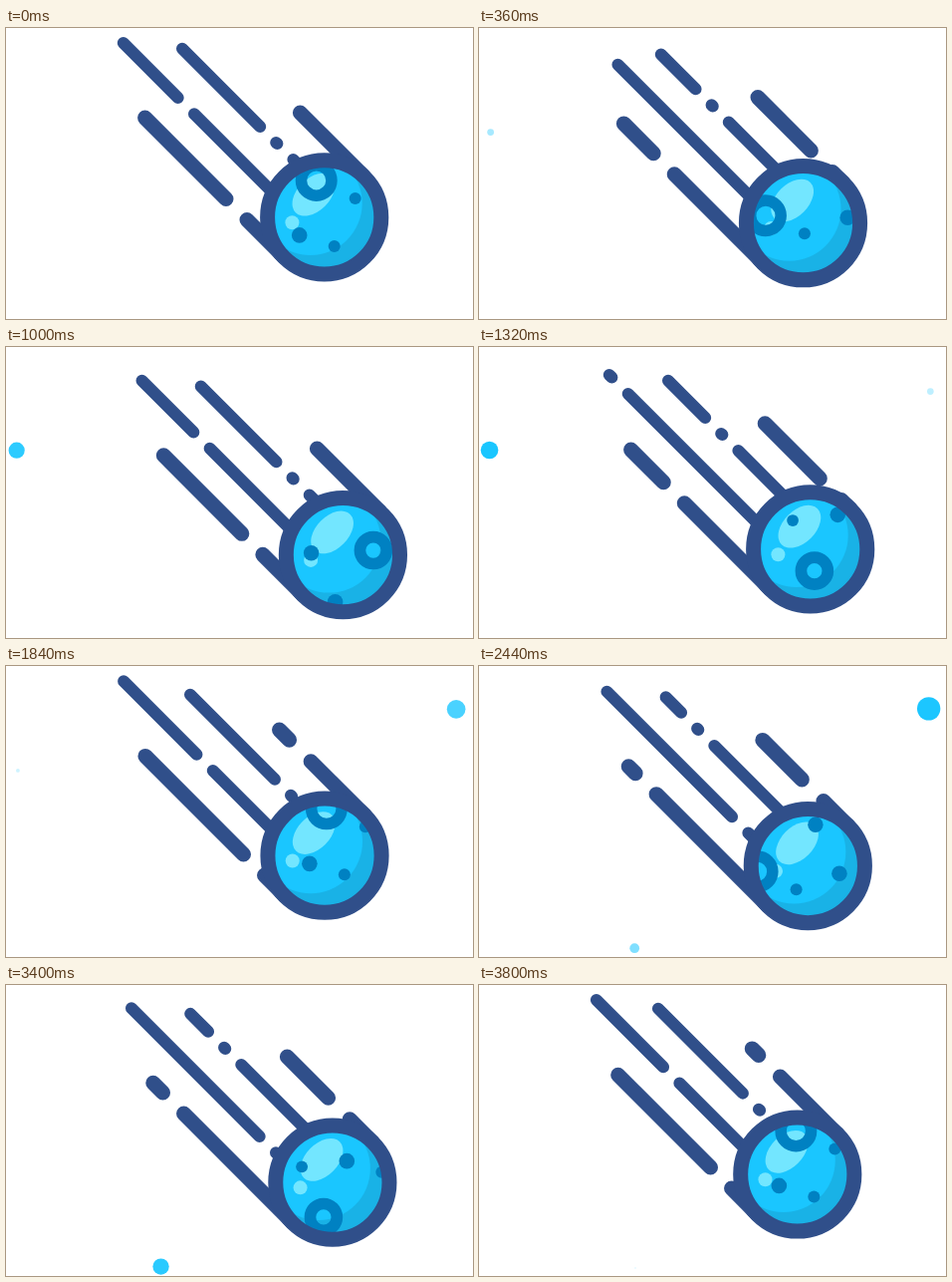
Animation, 469 px wide and 292 px high, one loop 3840 ms. Source, as an HTML page with a canvas:

```html
<!DOCTYPE html>
<html lang="en">
<head>
<meta charset="utf-8">
<title>Comet</title>
<style>
  html, body { margin: 0; width: 100%; height: 100%; overflow: hidden; background: #fff; }
  canvas { display: block; }
</style>
</head>
<body>
<canvas id="stage" width="469" height="292"></canvas>
<script>
const ctx = document.getElementById('stage').getContext('2d');

const LOOP = 3840, FLIGHT = 1920, STEP = 40;
const CYCLE = FLIGHT + STEP; // the moving patterns skip one step whenever a flight restarts
const NAVY = '#304f8a', CYAN = '#1ac6ff', SHADE = '#19b2e6', GLOW = '#73e6ff', CRATER = '#0081c2';
const INNER = 49.6, RIM = 15, CRATER_TRAVEL = 161;

// Diagonal streaks: x range, x - y, width, dash start at phase 0, dash pattern (measured along x)
const streaks = [
  { from: 117.8, to: 300, diff: 102.8, width: 12, start: 189, dash: [134.4, 16.3] },
  { from: 177, to: 320, diff: 156.3, width: 12, start: 288.4, dash: [85, 16, 1.2, 16] },
  { from: 139.6, to: 279.5, diff: 49.5, width: 15, start: 242, dash: [119.4, 21] },
  { from: 274.2, to: 360, diff: 210.4, width: 15, start: 295.4, dash: [63.4, 21.6] }
];

// Craters relative to the comet centre at phase 0; those with a hole are rings
const craters = [
  { x: -8, y: -37, r: 21, hole: 9.5 },
  { x: -25, y: 18, r: 7.8 },
  { x: 10, y: 29, r: 6 },
  { x: 31, y: -19, r: 6 },
  { x: 50.3, y: -84, r: 7.7 },
  { x: 74.3, y: -35, r: 7.8 },
  { x: 112.6, y: -86.7, r: 19.3, hole: 7.6 },
  { x: 90.8, y: -137.3, r: 5.9 }
];

const sparks = [
  { x: 12.3, y: 105.3, r: 8.8, delay: 0 },
  { x: 454, y: 45.2, r: 11.8, delay: 1050 },
  { x: 157.2, y: 284.2, r: 8.8, delay: FLIGHT }
];

function disc(x, y, r, color) {
  ctx.beginPath();
  ctx.arc(x, y, r, 0, 2 * Math.PI);
  ctx.fillStyle = color;
  ctx.fill();
}

function ring(x, y, r, width, color) {
  ctx.beginPath();
  ctx.arc(x, y, r, 0, 2 * Math.PI);
  ctx.lineWidth = width;
  ctx.strokeStyle = color;
  ctx.stroke();
}

// Slow swell from 30 to 1340 ms, then a quicker fade until 1920 ms
function pulse(age) {
  if (age <= 30 || age >= FLIGHT) return 0;
  const quarter = Math.PI / 2;
  return age < 1340
    ? Math.sin(quarter * (age - 30) / 1310)
    : Math.cos(quarter * (age - 1340) / 580);
}

function drawSpark({ x, y, r, delay }, time) {
  const size = pulse(time - delay);
  if (!size) return;
  const drift = 0.2 * r * size;
  ctx.globalAlpha = size;
  disc(x - drift, y - drift, r * size, CYAN);
  ctx.globalAlpha = 1;
}

function drawStreak({ from, to, diff, width, start, dash }, phase) {
  const period = dash.reduce((sum, part) => sum + part, 0);
  const shift = 2 * period * phase / CYCLE;
  ctx.setLineDash(dash.map(part => part * Math.SQRT2));
  ctx.lineDashOffset = (from - start + shift) * Math.SQRT2;
  ctx.lineCap = 'round';
  ctx.lineWidth = width;
  ctx.strokeStyle = NAVY;
  ctx.beginPath();
  ctx.moveTo(from, from - diff);
  ctx.lineTo(to, to - diff);
  ctx.stroke();
  ctx.setLineDash([]);
}

function drawCrater({ x, y, r, hole }, shift) {
  if (hole) ring(x - shift, y + shift, (r + hole) / 2, r - hole, CRATER);
  else disc(x - shift, y + shift, r, CRATER);
}

function drawComet(phase) {
  ctx.save();
  ctx.translate(319.7, 189.9);
  disc(0, 0, INNER + RIM / 2, SHADE);

  ctx.save();
  ctx.beginPath();
  ctx.arc(0, 0, INNER + 1, 0, 2 * Math.PI);
  ctx.clip();
  disc(-14, -14, 52, CYAN);
  ctx.beginPath();
  ctx.ellipse(-10.8, -22.7, 25.5, 16.2, -Math.PI / 4, 0, 2 * Math.PI);
  ctx.fillStyle = GLOW;
  ctx.fill();
  disc(-32.3, 5.3, 7, GLOW);

  const shift = CRATER_TRAVEL * phase / CYCLE;
  for (const crater of craters) {
    drawCrater(crater, shift);
    drawCrater(crater, shift - CRATER_TRAVEL);
  }
  ctx.restore();

  ring(0, 0, INNER + RIM / 2, RIM, NAVY);
  ctx.restore();
}

function draw(now) {
  const time = Math.floor(now / STEP) * STEP % LOOP;
  const phase = time % FLIGHT;
  const bob = 9.4 * (1 - Math.cos(2 * Math.PI * phase / FLIGHT));

  ctx.fillStyle = '#fff';
  ctx.fillRect(0, 0, 469, 292);
  sparks.forEach(spark => drawSpark(spark, time));

  ctx.save();
  ctx.translate(bob, bob);
  streaks.forEach(streak => drawStreak(streak, phase));
  drawComet(phase);
  ctx.restore();
}

function tick(now) {
  draw(now);
  requestAnimationFrame(tick);
}

draw(0);
requestAnimationFrame(tick);
</script>
</body>
</html>
```
